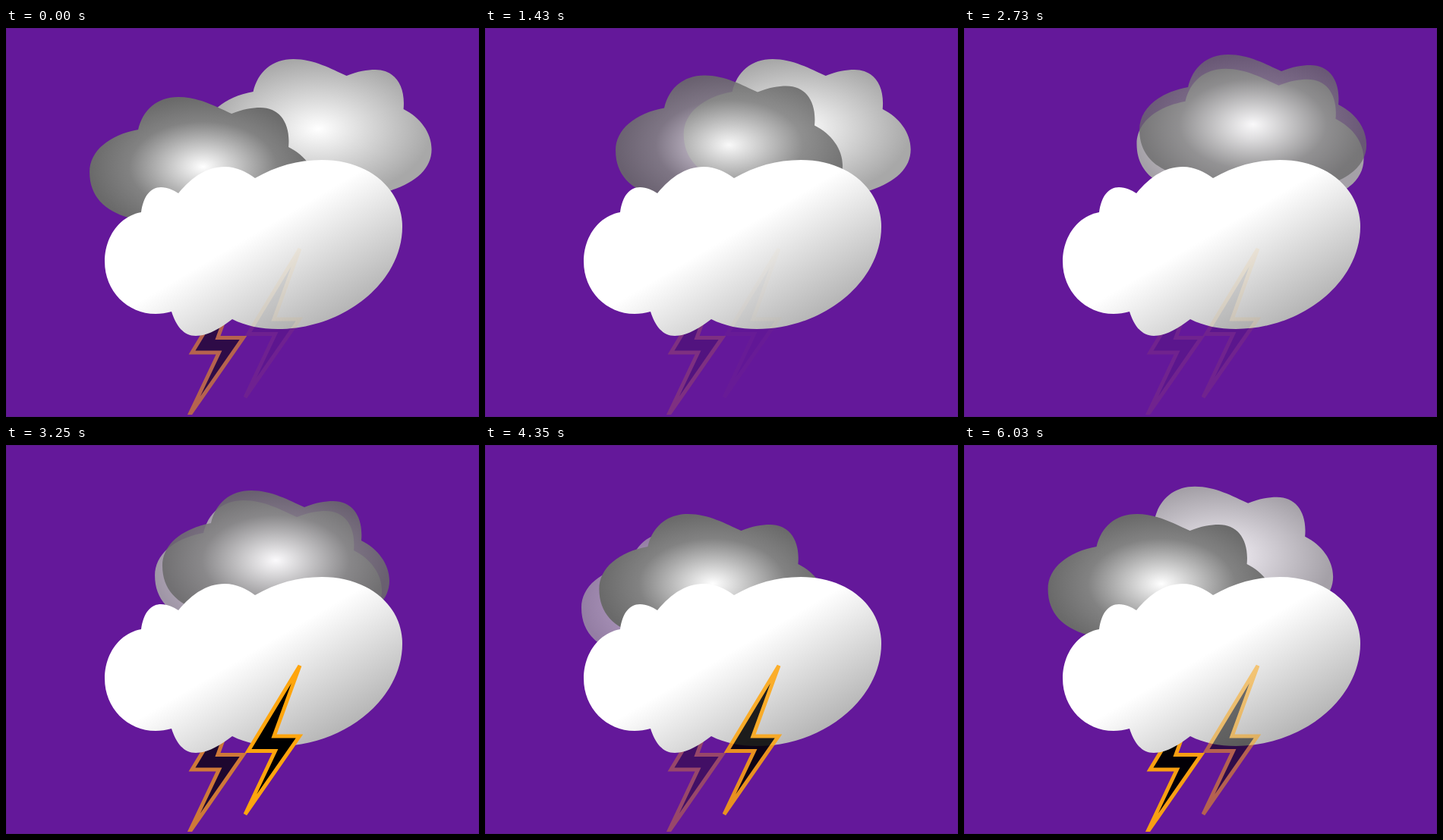
An HTML page for the animation above (6130 ms loop, 623 px wide and 513 px high).

```html
<!DOCTYPE html>
<html lang="en">
<head>
<meta charset="utf-8">
<title>Thunderstorm</title>
<style>
  html, body { margin: 0; width: 100%; height: 100%; overflow: hidden; background: #64189a; }
  svg { display: block; width: 623px; height: 513px; }
</style>
</head>
<body>
<svg viewBox="0 0 623 513">
  <defs>
    <radialGradient id="lightFill">
      <stop offset="0" stop-color="#fff"/>
      <stop offset="1" stop-color="#a8a8a8"/>
    </radialGradient>
    <radialGradient id="darkFill">
      <stop offset="0" stop-color="#fff"/>
      <stop offset=".65" stop-color="#828282"/>
      <stop offset="1" stop-color="#6a6a6a"/>
    </radialGradient>
    <linearGradient id="frontFill" x1="0" y1="0" x2="1" y2="1">
      <stop offset=".46" stop-color="#fff"/>
      <stop offset="1" stop-color="#959595"/>
    </linearGradient>
    <clipPath id="ground"><path d="M0 0H623V510H0Z"/></clipPath>
    <path id="puff" d="M111 190C111 162 137 141 175 134C181 108 200 91 228 91C255 91 278 104 298 113
      C313 107 325 105 336 105C361 105 376 125 373 157C395 168 410 188 410 210C410 235 390 253 357 264
      C330 273 290 275 255 275C220 275 190 262 162 250C131 241 111 222 111 190Z"/>
    <path id="bolt" d="M387 291L319 403.5H354.5L315 487L386.5 384H353Z"
      stroke="#ffa50d" stroke-width="5"/>
  </defs>
  <path d="M0 0H623V513H0Z" fill="#64189a"/>
  <path d="M.5 .5H622.5V512.5H.5Z" fill="none" stroke="#5b1c88"/>
  <use id="light" href="#puff" fill="url(#lightFill)"/>
  <use id="dark" href="#puff" fill="url(#darkFill)"/>
  <g clip-path="url(#ground)"><use id="backBolt" href="#bolt" x="-74" y="24.5"/></g>
  <path fill="url(#frontFill)" d="M178 243C181 222 190 210 204 210C213 210 221 214 227 218
    C246 195 266 183 288 183C304 183 317 190 328 198C356 182 384 174 416 174C478 174 522 212 522 262
    C522 335 445 397 358 397C336 397 316 393 298 384C281 397 265 406 250 406C234 406 224 393 218 374
    C211 376 204 377 197 377C160 377 130 347 130 308C130 275 150 248 178 243Z"/>
  <use id="frontBolt" href="#bolt"/>
</svg>
<script>
const LOOP = 6130, TICK = LOOP / 61, FLASH = 1250;
const get = id => document.getElementById(id);

// Each drift visits its [x, y, opacity] points in turn, at constant speed.
const drifts = [
  { el: get('light'), start: 400, step: 2000,
    points: [[165, -50, 1], [137, -50, 1], [12, 27, .7], [90, -50, 1]] },
  { el: get('dark'), start: 850, step: 1500,
    points: [[13, 0, 1], [139, -75, .7], [64, 0, 1], [-12, 0, 1]] }
];
const flashes = [
  { el: get('backBolt'), peak: 965 },
  { el: get('frontBolt'), peak: 740 }
];

function drift({ el, start, step, points }, t) {
  const n = points.length;
  const pos = ((t - start) / step + n) % n;
  const i = Math.floor(pos);
  const next = points[(i + 1) % n];
  const [x, y, alpha] = points[i].map((v, k) => v + (next[k] - v) * (pos - i));
  el.setAttribute('transform', `translate(${x} ${y})`);
  el.setAttribute('opacity', alpha);
}

function flash({ el, peak }, t) {
  el.setAttribute('opacity', .5 + .5 * Math.cos((t - peak) / FLASH * 2 * Math.PI));
}

const origin = performance.now();
function draw() {
  const elapsed = (performance.now() - origin) % LOOP;
  const t = Math.floor(elapsed / TICK) * TICK + 15;
  drifts.forEach(d => drift(d, t));
  flashes.forEach(f => flash(f, t));
  requestAnimationFrame(draw);
}
draw();
</script>
</body>
</html>
```
